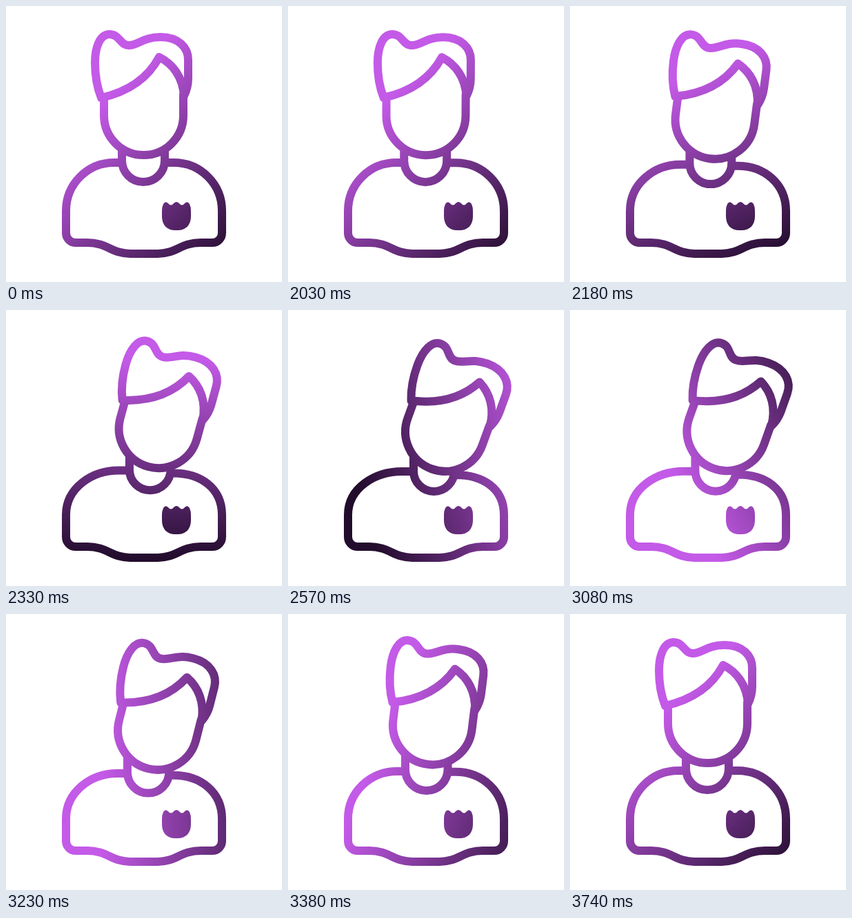
These frames come from a looping animation (400x400 px, 3770 ms). An HTML page with a canvas:

```html
<!DOCTYPE html>
<html>
<head>
<meta charset="utf-8">
<style>
html, body { margin: 0; width: 100%; height: 100%; overflow: hidden; background: #fff; }
canvas { display: block; }
</style>
</head>
<body>
<canvas id="stage" width="400" height="400"></canvas>
<script>
const ctx = document.getElementById('stage').getContext('2d');
const LOOP = 3770, RAD = Math.PI / 180;

// [time in ms, value]: head angle, shoulder drop (0 to 1), gradient angle
const LEAN = [[0, 0], [2000, 0], [2030, 0.3], [2330, 15.3], [2570, 20], [2800, 20.3],
  [3080, 19.6], [3380, 7], [3650, 0.5], [3740, 0], [LOOP, 0]];
const SINK = [[0, 0], [2000, 0], [2330, 0.78], [2570, 1], [2800, 1.01],
  [3080, 0.96], [3380, 0.14], [3650, 0], [LOOP, 0]];
const TURN = [[0, 0], [2000, 0], [2030, 1], [2330, 45], [2570, 118], [3080, 286],
  [3380, 336], [3650, 359], [3740, 360], [LOOP, 360]];

const HEAD = new Path2D(
  'M138 133C132 118 129 98 129 82C129 60 136 41 150 41C165 41 165 57 178 57' +
  'C192 57 198 45 224 45C250 45 264 60 264 78V105C264 115 262 122 258 130' +
  'C256 103 242 84 222 74C206 104 178 124 138 133Z' +
  'M142 133V158.5A57.5 57.5 0 0 0 257 158.5V128');
const BADGE = new Path2D(
  'M228 287Q231 282 235 286Q239 291 243 286Q247 282 251 286Q255 291 259 286' +
  'Q263 282 266 287Q268 291 268 297V305C268 318 260 325 249 325H245' +
  'C234 325 226 318 226 305V297Q226 291 228 287Z');

// Smooth interpolation that never overshoots the keys
function sample(keys, t) {
  const slope = i => (keys[i + 1][1] - keys[i][1]) / (keys[i + 1][0] - keys[i][0]);
  const tangent = i => {
    if (i < 1 || i > keys.length - 2) return 0;
    const a = slope(i - 1), b = slope(i);
    return a * b > 0 ? 2 * a * b / (a + b) : 0;
  };
  let i = 0;
  while (i < keys.length - 2 && t >= keys[i + 1][0]) i++;
  const [t0, v0] = keys[i], [t1, v1] = keys[i + 1];
  const d = t1 - t0, u = (t - t0) / d, w = 1 - u;
  return v0 * w * w * (1 + 2 * u) + v1 * u * u * (3 - 2 * u) +
    d * u * w * (tangent(i) * w - tangent(i + 1) * u);
}

// The gradient turns about a point right of the figure's centre
function gradient(turn) {
  const angle = (225 + turn) * RAD;
  const at = r => [258 + r * Math.cos(angle), 191 + r * Math.sin(angle)];
  const g = ctx.createLinearGradient(...at(120), ...at(-170));
  g.addColorStop(0, '#c45ae8');
  g.addColorStop(1, '#220c2c');
  return g;
}

function figure(lean, sink) {
  const pose = new DOMMatrix()
    .translate(200 + 0.18 * lean, 230 + 13.6 * sink).rotate(lean).translate(-200, -230);
  const chin = pose.transformPoint(new DOMPoint(199.5, 158.5));
  const jaw = x => chin.y + Math.sqrt(57.5 ** 2 - (x - chin.x) ** 2);

  const left = 168 + 14 * sink, right = 230 + 11 * sink;
  const collar = 224 + 9.5 * sink, r = (right - left) / 2;
  const yl = 227 + 7 * sink, yr = 227 + 12 * sink;
  const xl = 157 + 8 * sink, xr = 243;

  const path = new Path2D(
    `M${left} ${jaw(left)}V${collar}A${r} ${r} 0 0 0 ${right} ${collar}V${jaw(right)}` +
    `M${left} ${yl}H${xl}C${xl - 39} ${yl} 87 258 87 297V329A14 14 0 0 0 101 343H118` +
    'C146 343 154 359 180 359H220C246 359 254 343 282 343H299A14 14 0 0 0 313 329V297' +
    `C313 258 282 ${yr} ${xr} ${yr}H${right}`);
  path.addPath(HEAD, pose);
  return path;
}

function draw() {
  const t = performance.now() % LOOP;
  ctx.clearRect(0, 0, 400, 400);
  ctx.strokeStyle = ctx.fillStyle = gradient(sample(TURN, t));
  ctx.lineWidth = 12;
  ctx.lineCap = ctx.lineJoin = 'round';
  ctx.stroke(figure(sample(LEAN, t), sample(SINK, t)));
  ctx.fill(BADGE);
  requestAnimationFrame(draw);
}
draw();
</script>
</body>
</html>
```
